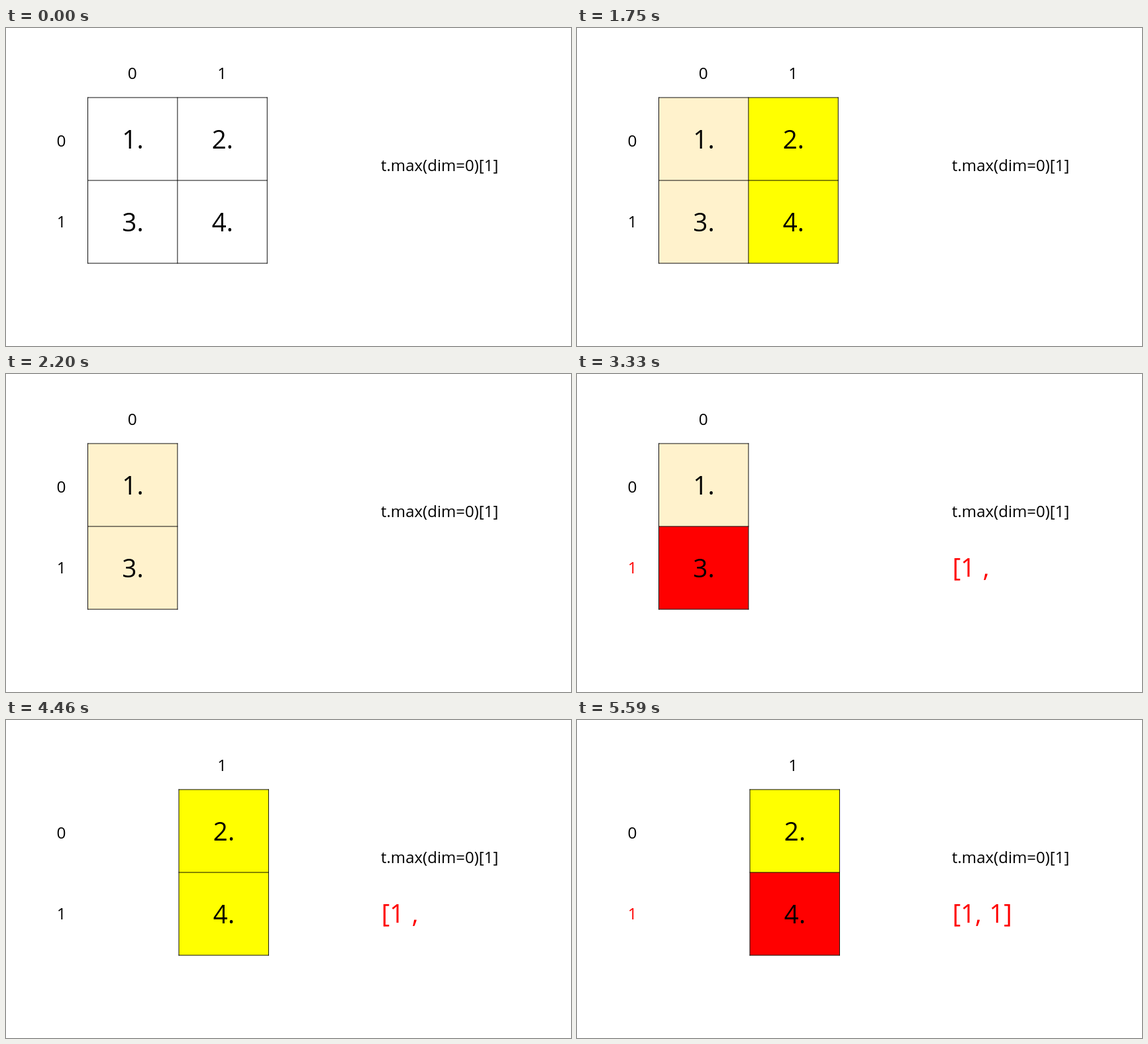
An HTML page with a canvas for the animation above (6720 ms loop, 853 by 480 pixels).

```html
<!DOCTYPE html>
<html lang="en">
<head>
<meta charset="utf-8">
<title>Max index along a dimension</title>
<style>
html, body { margin: 0; width: 100%; height: 100%; overflow: hidden; background: #fff; }
canvas { display: block; }
</style>
</head>
<body>
<canvas id="stage" width="853" height="480"></canvas>
<script>
const ctx = document.getElementById('stage').getContext('2d');
const LOOP = 6720, FIRST = 1070, STEP = 1130;
const BLACK = '#000', RED = '#f00', CREAM = '#fff2cc', YELLOW = '#ff0';
const LEFT = 123.5, TOP = 105, CELL_W = 135.4, CELL_H = 125.05;

const columns = [
  { values: ['1.', '3.'], fill: CREAM },
  { values: ['2.', '4.'], fill: YELLOW }
];

// Each step: visible columns, whether they are tinted, the picked row and the result so far.
const steps = [
  { show: [0, 1] },
  { show: [0, 1], tint: true },
  { show: [0], tint: true },
  { show: [0], tint: true, picked: true, result: '[1 ,' },
  { show: [1], tint: true, shift: 2.1, result: '[1 ,' },
  { show: [1], tint: true, shift: 2.1, picked: true, result: '[1, 1]' }
];

function text(str, x, y, size, color = BLACK, align = 'center') {
  ctx.font = `${size}px "Open Sans", "Noto Sans", sans-serif`;
  ctx.textAlign = align;
  ctx.fillStyle = color;
  ctx.fillText(str, x, y);
}

function rect(x, y, w, h, color) {
  ctx.fillStyle = color;
  ctx.fillRect(x, y, w, h);
}

function drawFill(index, { tint, picked, shift = 0 }) {
  if (!tint) return;
  const x = LEFT + index * CELL_W + shift;
  const { fill } = columns[index];
  rect(x, TOP, CELL_W, 2 * CELL_H, fill);
  if (picked) rect(x, TOP + CELL_H, CELL_W, CELL_H, RED);
}

function drawGrid({ show, shift = 0 }) {
  const left = LEFT + show[0] * CELL_W + shift;
  const right = left + show.length * CELL_W;
  const bottom = TOP + 2 * CELL_H;
  ctx.lineWidth = 0.95;
  ctx.strokeStyle = BLACK;
  ctx.lineCap = 'square';
  ctx.beginPath();
  for (let row = 0; row <= 2; row++) {
    const y = TOP + row * CELL_H;
    ctx.moveTo(left, y);
    ctx.lineTo(right, y);
  }
  for (let col = 0; col <= show.length; col++) {
    const x = left + col * CELL_W;
    ctx.moveTo(x, TOP);
    ctx.lineTo(x, bottom);
  }
  ctx.stroke();
}

function drawLabels(index, { shift = 0 }) {
  const center = LEFT + (index + 0.5) * CELL_W;
  columns[index].values.forEach((value, row) =>
    text(value, center + 0.3 + shift, 182 + row * CELL_H, 38.6));
  text(String(index), center - 0.5, 77, 24.4);
}

function draw(step) {
  rect(0, 0, 853, 480, '#fff');
  step.show.forEach(index => drawFill(index, step));
  drawGrid(step);
  step.show.forEach(index => drawLabels(index, step));
  text('0', 83.4, 179, 24.4);
  text('1', 83.8, 301, 24.4, step.picked ? RED : BLACK);
  text('t.max(dim=0)[1]', 566, 216, 24, BLACK, 'left');
  if (step.result) {
    ctx.wordSpacing = '2px';
    text(step.result, 566.8, 306, 38.2, RED, 'left');
    ctx.wordSpacing = '0px';
  }
}

const start = performance.now();
function frame() {
  const t = (performance.now() - start) % LOOP;
  const index = t < FIRST ? 0 : 1 + Math.floor((t - FIRST) / STEP);
  draw(steps[Math.min(index, steps.length - 1)]);
  requestAnimationFrame(frame);
}
frame();
</script>
</body>
</html>
```
